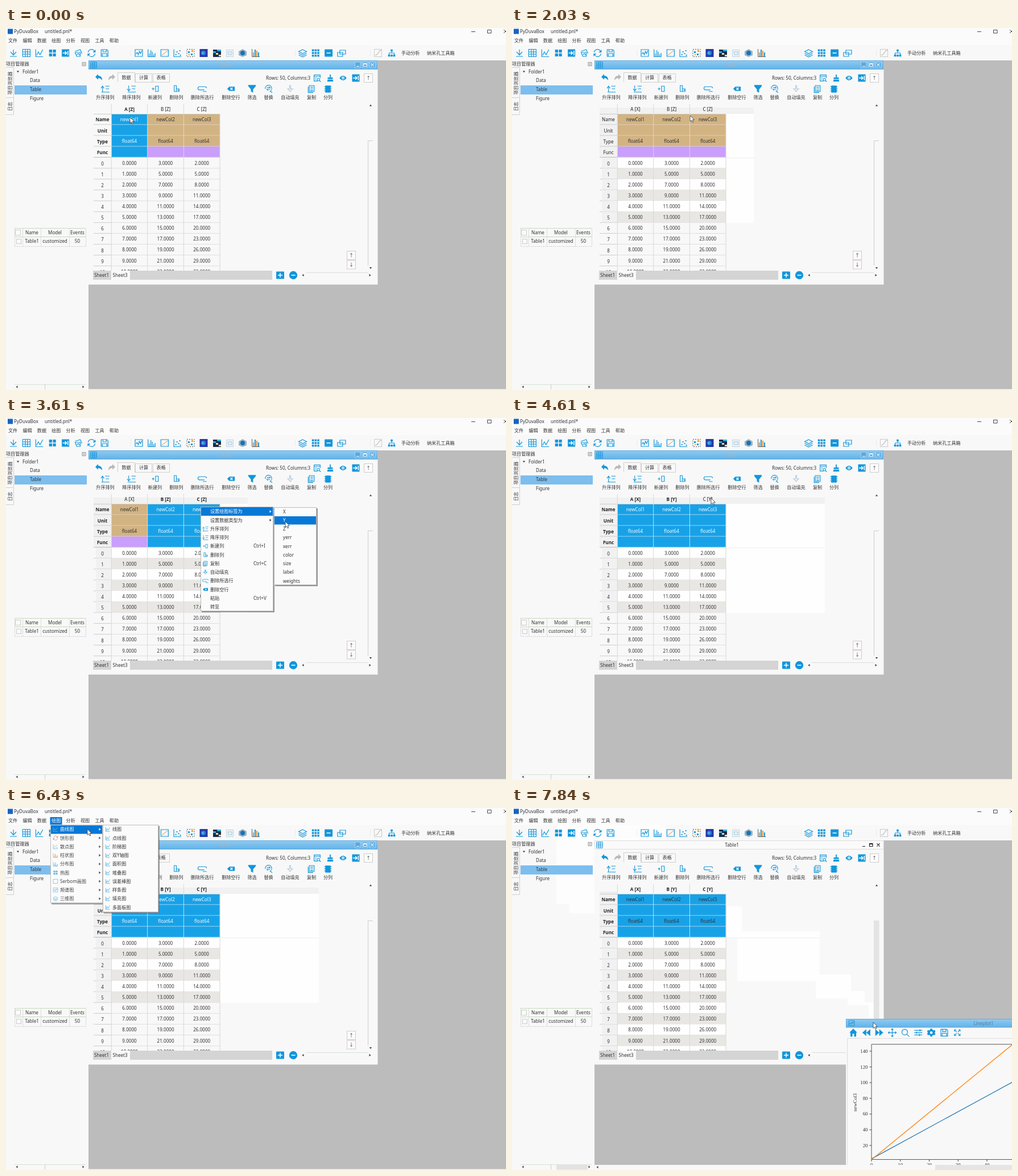
Write an HTML page that moves like this. It is 879 px wide and 637 px high and loops after 8 s.

```html
<!DOCTYPE html>
<html lang="zh-CN">
<head>
<meta charset="utf-8">
<title>Table to line plot</title>
<style>
html,body{margin:0;width:100%;height:100%;overflow:hidden;background:#f8f8f8}
svg{display:block;width:100%;height:100%}
text{font:8.1px 'Noto Sans','Noto Sans CJK SC','Noto Sans CJK',sans-serif;white-space:pre}
.serif text{font:8.8px 'Liberation Serif',serif}
</style>
</head>
<body>
<svg viewBox="0 0 879 637">
<defs>
<linearGradient id="bar" x2="0" y2="1"><stop stop-color="#8fcaf2"/><stop offset="1" stop-color="#62b2e8"/></linearGradient>
<clipPath id="cells"><path d="M146 130H653V427H146Z"/></clipPath>
<clipPath id="plot"><path d="M587 371H879V628H587Z"/></clipPath>
</defs>
<path d="M0 0H879V30H0Z" fill="#fbfbfb"/>
<path id="trace" d="M78 30H270V57H145V185H101V169H78Z" fill="#fdfdfd"/>
<g id="base"></g><g id="live"></g>
</svg>
<script>
const BLUE = '#1296db', SEL = '#17a2e8', HOT = '#0878d7', BG = '#f8f8f8', TAN = '#d2b382', GREY = '#d4d4d4';
const LOOP = 8000, ROW = 19.1, HEAD = 151.3, BODY = HEAD + 4 * ROW;

const text = (x, y, s, o = {}) => `<text x="${x}" y="${y + 2.9}" fill="${o.fill || '#333'}"` +
  `${o.mid ? ' text-anchor="middle"' : ''}${o.end ? ' text-anchor="end"' : ''}` +
  `${o.bold ? ' style="font-weight:700"' : ''}${o.turn ? ` transform="rotate(-90 ${x} ${y})"` : ''}>${s}</text>`;
const mid = (x, y, s, fill, bold) => text(x, y, s, {mid: 1, fill, bold});
const rect = (x, y, w, h, fill, more = '') => `<rect x="${x}" y="${y}" width="${w}" height="${h}" fill="${fill}" ${more}/>`;
const line = (d, stroke, w = 1, more = '') => `<path d="${d}" fill="none" stroke="${stroke}" stroke-width="${w}" ${more}/>`;
const shape = (d, fill) => `<path d="${d}" fill="${fill}" fill-rule="evenodd"/>`;
const frame = (x, y, w, h, fill, stroke) => rect(x + .5, y + .5, w - 1, h - 1, fill, `stroke="${stroke}"`);
const tri = (x, y, turn, fill = '#444') => `<path d="M-1.5-2.2L1.5 0-1.5 2.2Z" fill="${fill}" transform="translate(${x} ${y}) rotate(${turn})"/>`;

// f: filled, s: stroked, w: stroked in white on top
const icons = {
  down: {s: 'M0-6V3M-5-2L0 3.5 5-2M-6 6H6'},
  grid: {s: 'M-6.5-6.5H6.5V6.5H-6.5ZM-6.5-2H6.5M-6.5 2H6.5M-2-6.5V6.5M2-6.5V6.5'},
  chart: {s: 'M-6.5-6.5V6.5H6.5M-5 4L-2-2 1 3 6-6'},
  quad: {f: 'M-6-6h5.3v5.3h-5.3zM.7-6H6v5.3H.7zM-6 .7h5.3V6h-5.3zM.7 .7H6V6H.7z'},
  go: {f: 'M-6.5-6.5H6.5V6.5H-6.5Z', w: 'M-5 0H2M-1-3L2 0-1 3M4.3-4V4'},
  stack: {s: 'M-6-3L3-6 6 1M-6-1H3V6H-3ZM-3 3L0 1 2 4'},
  turn: {s: 'M-6-1A6 6 0 0 1 5-3.5M6 1A6 6 0 0 1-5 3.5', f: 'M7-6V-1H2ZM-7 6V1H-2Z'},
  save: {s: 'M-6-6H4L6-4V6H-6ZM-3-6V-2H3V-6M-4 6V1H4V6'},
  wave: {s: 'M-6.5-6H6.5V6H-6.5ZM-5 2L-3-1-1 3 1-3 3 1 5-4'},
  bars: {s: 'M-6.5-6.5V6.5H6.5M-4 6V1M-1.5 6V-5M1 6V-2M3.5 6V2M6 6V0'},
  slope: {s: 'M-6.5-6H6.5V6H-6.5Z'},
  dots: {s: 'M-6.5-6.5V6.5H6.5', f: 'M-4 2h2v2h-2zM-2-3h2v2h-2zM1 0h2v2H1zM3-5h2v2H3zM4 3h2v2H4z'},
  layers: {s: 'M0-6L7-2.5 0 1-7-2.5ZM-7 .5L0 4 7 .5M-7 3.5L0 7 7 3.5'},
  nine: {f: [-6.5, -1.8, 2.9].flatMap(x => [-6.5, -1.8, 2.9].map(y => `M${x} ${y}h3.6v3.6h-3.6z`)).join('')},
  less: {f: 'M-6-6.5H6Q7-6.5 7-5.5V5.5Q7 6.5 6 6.5H-6Q-7 6.5-7 5.5V-5.5Q-7-6.5-6-6.5Z', w: 'M-3.5 0H3.5'},
  more: {f: 'M-6-6.5H6Q7-6.5 7-5.5V5.5Q7 6.5 6 6.5H-6Q-7 6.5-7 5.5V-5.5Q-7-6.5-6-6.5Z', w: 'M-4 0H4M0-4V4'},
  wins: {s: 'M-3-5H7V2H-3ZM-7-1H2V6H-7Z'},
  tree: {s: 'M0-4V0M-5 4V0H5V4', f: 'M-2-7H2V-3H-2ZM-7 3h4v4h-4zM-2 3H2V7H-2ZM3 3H7V7H3Z'},
  undo: {f: 'M-6-1L-1-6V-3Q6-3 6 5Q3 1-1 1V4Z'},
  redo: {f: 'M6-1L1-6V-3Q-6-3-6 5Q-3 1 1 1V4Z'},
  asc: {s: 'M-5-4V6M-8-1L-5-5-2-1M0-5H8M1 0H7M-7 6H8'},
  desc: {s: 'M-5-6V4M-8 0L-5 4-2 0M0-5H8M1 0H7M-7 6H8'},
  addCol: {s: 'M1-5H6V5H1ZM-6 0H-1M-3.5-2.5V2.5'},
  delCol: {s: 'M-4-6H0V5H-4ZM0 0H5V5H0M2 2.5H6'},
  delSel: {s: 'M4 2H-5Q-8 2-8-1T-5-4H5Q8-4 8-1M1 5H8'},
  delRow: {f: 'M-7 0L-3-4H7V4H-3Z', w: 'M-1-2L3 2M3-2L-1 2'},
  filter: {f: 'M-7-7H7V-5L2 1V7L-2 5V1L-7-5Z'},
  swap: {s: 'M-6 0A6 6 0 1 1 3 4.5L7 7M-3-2H3L1-4M3 1H-3L-1 3'},
  fill: {s: 'M-1-6V0H-4L0 5 4 0H1V-6ZM-6 0H-4M4 0H6'},
  copy: {s: 'M-4-6H5V5H-4ZM-2-3H3M-2 0H3M-2 3H3M-6-4V7H3'},
  split: {f: 'M-5-6H5V7H-5Z', s: 'M-7-4H7M-7 0H7M-7 4H7'},
  find: {s: 'M1 6H-6V-6H6V0M-6-3H6M-4 0H-1M-4 3H-2M0 3A2.5 2.5 0 1 0 5 3 2.5 2.5 0 1 0 0 3M4.5 5L7 7.5'},
  broom: {f: 'M-1-7H1V-1H5V2H-5V-1H-1ZM-5 3H5L6 7H-6Z'},
  eye: {f: 'M-7 0Q0-9 7 0Q0 9-7 0Z', w: 'M-2 0A2 2 0 1 0 2 0 2 2 0 1 0-2 0'},
  home: {f: 'M0-7L7 0H5V7H1.5V2H-1.5V7H-5V0H-7Z'},
  back: {f: 'M0-6V6L-7 0ZM7-6V6L0 0Z'},
  next: {f: 'M0-6V6L7 0ZM-7-6V6L0 0Z'},
  pan: {s: 'M0-7V7M-7 0H7M-2-5L0-7 2-5M-2 5L0 7 2 5M-5-2L-7 0-5 2M5-2L7 0 5 2'},
  zoom: {s: 'M-6-1A5 5 0 1 0 4-1 5 5 0 1 0-6-1M2.5 2.5L7 7'},
  tune: {s: 'M-7-4H7M-7 0H7M-7 4H7M3-6V-2M-3-2V2M2 2V6'},
  gear: {f: 'M-1.5-7H1.5L2-5 4-4 6-4.5 7.3-2 6 0 7.3 2 6 4.5 4 4 2 5 1.5 7H-1.5L-2 5-4 4-6 4.5-7.3 2-6 0-7.3-2-6-4.5-4-4-2-5ZM-2.4 0A2.4 2.4 0 1 0 2.4 0 2.4 2.4 0 1 0-2.4 0Z'},
  full: {s: 'M-5-2V-5H-2M2-5H5V-2M5 2V5H2M-2 5H-5V2M-4-4L-1-1M4-4L1-1M4 4L1 1M-4 4L-1 1'}
};
const icon = (name, x, y, k = 1, c = BLUE, w = 1.2) => {
  const {f, s, w: hole} = icons[name];
  return `<g transform="translate(${x} ${y}) scale(${k})">${f ? shape(f, c) : ''}${s ? line(s, c, w) : ''}${hole ? line(hole, '#fff', 1.5) : ''}</g>`;
};
const iconRow = (names, x, y, gap) => names.split(' ').map((n, i) => icon(n, x + gap * i, y)).join('');

const tools = [['asc', 174.5, '升序排列'], ['desc', 220.5, '降序排列'], ['addCol', 262, '新建列'], ['delCol', 299.5, '删除列'],
  ['delSel', 345, '删除所选行'], ['delRow', 395.5, '删除空行'], ['filter', 432.5, '筛选'], ['swap', 461.5, '替换'],
  ['fill', 499.5, '自动填充'], ['copy', 537, '复制'], ['split', 566, '分列']];

function chrome() {
  let s = rect(3, 1.5, 9, 9, '#1764c0') + text(14, 6, 'PyDuvaBox') + text(68, 6, 'untitled.pnl*');
  s += line('M818 6.5H825M846.5 3.5H853V9H846.5ZM875 3L881 9M881 3L875 9', '#333', .9);
  '文件 编辑 数据 绘图 分析 视图 工具 帮助'.split(' ').forEach((m, i) => s += text(4 + 25.4 * i, 22, m));
  s += iconRow('down grid chart quad go stack turn save', 13, 44, 22.9);
  s += iconRow('wave bars slope dots', 233.5, 44, 22.7) + line('M274 48L284 40', '#e88a3c');
  s += line('M219.5 38V50M508.5 38V50M640.5 38V50', '#ddd', 1, 'stroke-dasharray="1 1"');
  s += line('M318 37.5H331V50.5H318Z', '#555', 1, 'stroke-dasharray="2 2"') +
    shape('M320 41h3v3h-3zM325 45h3v3h-3z', BLUE) + shape('M326 39h3v3h-3zM321 46h2v2h-2z', '#e8a33c');
  s += rect(340.5, 37, 14, 14, '#2638a8') + '<circle cx="347" cy="44" r="4" fill="#2f80d8"/><circle cx="346" cy="44" r="1.8" fill="#48c8d8"/>';
  s += rect(364, 38, 14, 13, '#1a2c4c') + shape('M364 41h5v3h-5zM371 38h7v3h-7z', '#39a8dc') + shape('M369 44h4v3h-4zM374 47h4v3h-4z', '#e8dc90');
  s += frame(387, 38, 13, 13, '#edf3f7', '#c4d4de') + line('M390 42H397V47H391Z', '#9cc4dc');
  s += shape('M409 41L416 37 423 41V48L416 51 409 48Z', '#9db3c2') + '<circle cx="416" cy="44" r="4" fill="#1673b8"/>';
  s += line('M432.5 37V50.5H446', '#666') + shape('M434 43h2v7h-2zM440 40h2v10h-2z', '#e89030') + shape('M437 38h2v12h-2zM443 43h2v7h-2z', BLUE);
  s += iconRow('layers nine less wins', 521.5, 44, 22.8);
  s += frame(647, 37, 14, 14, BG, '#ccc') + line('M649 48Q654 47 655 43T660 39', '#aaa') + icon('tree', 678, 44, .9);
  s += text(695, 44.5, '手动分析') + text(740, 44.5, '纳米孔工具箱');

  // project dock
  s += text(0, 63.5, '项目管理器') + line('M134 60.5H140V66.5H134ZM135.5 62L138.5 65M138.5 62L135.5 65', '#777', .8);
  s += line('M0 69.5H13.5V122.5H0M13.5 123V152.5H0', '#d0d0d0');
  s += text(7, 97, '项目浏览器', {mid: 1, turn: 1}) + text(7, 138, '日志', {mid: 1, turn: 1});
  s += rect(15, 101, 127, 16, '#7dbeee') + tri(21, 77, 90) + text(29, 77, 'Folder1') +
    text(42, 92.5, 'Data') + text(42, 108.5, 'Table') + text(42, 124.5, 'Figure');
  s += line('M15 352.5H140.5M15 367.5H140.5', '#c4dcbc') + line('M29.5 353V384M61.5 353V384M111.5 353V384M140.5 353V384', '#ddd') +
    line('M15.5 353V384.5H140', '#ccc', 1, 'stroke-dasharray="2 1.5"');
  s += frame(16, 355, 10, 10, '#fafafa', '#ccc') + frame(18, 371, 9, 9, '#fafafa', '#ccc');
  ['Name', 'Model', 'Events'].forEach((h, i) => s += mid([45.5, 86, 125.5][i], 360.5, h));
  ['Table1', 'customized', '50'].forEach((h, i) => s += mid([45.5, 86, 125.5][i], 375.5, h));
  s += line('M15 627.5H140', '#d6e2d2') + tri(19, 631.5, 180) + tri(136, 631.5, 0) + line('M68.5 627V636', '#ccc');

  // table window
  s += rect(145, 57, 734, 578.5, '#bcbcbc') + rect(145, 57, 508.5, 394.5, BG);
  s += icon('undo', 163, 87) + icon('redo', 186, 87, 1, '#b8b8b8');
  s += line('M196.5 95V78.5H226.5V95M227.5 95V80.5H256.5V95M258.5 95V80.5H287.5V95M226 95.5H288', '#d0d0d0');
  ['数据', '计算', '表格'].forEach((n, i) => s += mid(211.5 + 30.5 * i, 87, n));
  s += text(457, 88.5, 'Rows: 50, Columns:3') + icon('find', 547, 88, .9) + icon('broom', 570, 88, .9) + icon('eye', 592.5, 88, .9) + icon('go', 615, 88);
  s += frame(629, 80, 16, 16, '#fdfdfd', '#ccc') + mid(637, 88, '↑');
  tools.forEach(([n, x, label]) => s += icon(n, x, 107, .95, n == 'fill' ? '#a9c8dc' : BLUE) + mid(x, 122.5, label));
  s += tri(641, 136, -90) + tri(641, 422.5, 90) + line('M645 198.5H636.5V418', '#c9cfcb');
  [400, 416.5].forEach((y, i) => s += frame(599, y - 8, 16, 16, '#fafafa', '#d5c8d2') + mid(607, y, '↑↓'[i]));
  s += rect(153, 427, 32, 16, GREY) + rect(218, 427, 250, 16, GREY) + text(155, 435, 'Sheet1') + text(187.5, 435, 'Sheet3');
  s += icon('more', 482, 435) + '<circle cx="505" cy="435" r="7.2" fill="#1296db"/>' + line('M501.5 435H508.5', '#fff', 1.5);
  return s + tri(522, 435, 180) + tri(640, 435, 0) + line('M527 430.5H637', '#d9ded8');
}

// start, end, steps, from, to, ease out
const moves = [
  [0, 0, 1, 218, 157], [860, 1180, 4, 232, 160, 314, 161], [1420, 1660, 3, 335, 161, 363, 160], [2030, 2030, 1, 313, 154],
  [2140, 2380, 3, 281, 143, 336, 143], [2580, 2700, 2, 360, 148, 342, 157], [3120, 3490, 4, 375, 162, 486, 168],
  [3610, 3610, 1, 491, 182], [3980, 4320, 4, 440, 165, 216, 143], [4500, 4720, 3, 344, 141, 356, 141],
  [4930, 5530, 6, 330, 130, 86, 23], [5950, 6430, 5, 88, 28, 143, 37], [6540, 6660, 2, 185, 37, 256, 38],
  [6970, 7090, 2, 262, 75, 268, 119], [7210, 7210, 1, 397, 217], [7360, 7840, 5, 530, 290, 635, 377, 1]
];
function pointer(t) {
  const [a, b, n, x0, y0, x1 = x0, y1 = y0, ease] = moves.filter(m => m[0] <= t).pop();
  const i = b > a ? Math.min(n - 1, Math.floor((t - a) / (b - a) * (n - 1) + .02)) : 0;
  let u = n > 1 ? i / (n - 1) : 0;
  if (ease) u = 1 - (1 - u) ** 2;
  return [x0 + (x1 - x0) * u, y0 + (y1 - y0) * u];
}
// latest value whose time has come
const at = (t, list) => list.filter(e => e[0] <= t).pop()[1];
const NONE = [9, 9];
const selection = t => at(t, [[0, [0, 0]], [2030, NONE], [2140, [1, 1]], [2260, [1, 2]], [3980, NONE], [4320, [0, 0]], [4500, [0, 1]], [4610, [0, 2]]]);

function table(t) {
  const [first, last] = selection(t), any = first < 9, idle = t >= 7210;
  const yz = t >= 3980 ? 'Y' : 'Z', roles = [t >= 2030 ? 'X' : 'Z', yz, yz];
  const right = at(t, [[0, 0], [510, 350], [2030, 425], [3980, 550], [7210, 376]]);
  const bottom = idle ? 428 : 342.5;
  let s = '';
  if (right > 376) s += rect(376, 151, right - 376, 192, '#fefefe') + rect(154, 140, right - 154, 11, '#f1f1f1') + line(`M376 228.5H${right}`, '#eee');
  if (idle) s += shape('M378 173H404V217H541V293H596V322H620V342H635V370H627V347H590V335H534V305H396V228H378Z', '#fefefe') +
    line('M378 228.5H541', '#eee') + rect(154, 147, 31, 4, '#eee');
  for (let i = 0; i < 11; i++) {
    const y = BODY + ROW * i, h = Math.min(ROW, bottom - y);
    if (right && h > 0) {
      const x = t < 2030 ? 185 : 158;
      if (x < 185) s += rect(x, y, 27, h, '#f1f1f1');
      s += rect(185, y, Math.min(right, 376) - 185, h, i % 2 ? '#e8e7e3' : '#fefefe');
    }
    s += line(`M154 ${y + ROW}H185`, '#ccc') + line(`M185 ${y + ROW}H376`, '#e2dde0') + mid(169.5, y + 11.1, i);
    [i, 3 + 2 * i, 2 + 3 * i].forEach((v, c) => s += mid(217 + 63.6 * c, y + 10, v.toFixed(4)));
  }
  ['Name', 'Unit', 'Type', 'Func'].forEach((h, r) => {
    const y = HEAD + ROW * r;
    s += rect(154, y, 31, ROW, t >= 2030 ? '#f1f1f1' : BG) + line(`M154 ${y + ROW - .3}H185`, '#bbb') + mid(169.5, y + 10.2, h, '#222', any);
    for (let c = 0; c < 3; c++) {
      const on = c >= first && c <= last, x = 185.3 + 63.6 * c;
      s += rect(x, y, 63.6, ROW, on ? SEL : r < 3 ? TAN : '#c99efc') + line(`M${x} ${y + ROW - .4}H${x + 63.6}`, on ? '#b8dcf2' : '#ddd0c4');
      if (r % 2 == 0) s += mid(x + 31.7, y + 9.3, r ? 'float64' : `newCol${c + 1}`, on && !idle ? '#f4fbff' : '#333');
    }
  });
  roles.forEach((role, c) => s += mid(217 + 63.6 * c, 142.8, `${'ABC'[c]} [${role}]`, '#222', c >= first && c <= last && !(c == 2 && t >= 4610 && t < 4720)));
  s += line('M154 151.5H376', '#ccc') + line('M185.3 134V427M248.7 134V427M312.4 134V427M376 152V427', '#d6dad2');
  return `<g clip-path="url(#cells)">${s}</g>`;
}

function titleBar(idle) {
  const ink = idle ? '#222' : '#fff';
  return rect(145.5, 57.5, 507.5, 15, idle ? '#fafafa' : 'url(#bar)', `stroke="${idle ? '#ddd' : '#62acdf'}"`) + icon('grid', 154, 65, .8) +
    mid(386.5, 65.5, 'Table1', idle ? '#333' : '#a3b6c4') +
    (idle ? '' : [613, 626, 639].map(x => frame(x, 59.5, 10.5, 11, '#5aa9e0', '#a5d4f3')).join('')) +
    line('M616 67.5H621M628.5 62.5H634V67.5H628.5ZM628 63.5H634M641.5 62.5L646.5 67.5M646.5 62.5L641.5 67.5', ink, 1.2);
}

function box(x, y, w, h) {
  return rect(x + 2, y + 2, w, h, '#777', 'opacity=".75"') + frame(x, y, w, h, '#fbfbfb', '#bbb');
}
const STEP = 15.25;
const entries = [['', '设置绘图标签为'], ['', '设置数据类型为'], ['asc', '升序排列'], ['desc', '降序排列'], ['addCol', '新建列', 'Ctrl+I'], ['delCol', '删除列'],
  ['copy', '复制', 'Ctrl+C'], ['fill', '自动填充'], ['delSel', '删除所选行'], ['delRow', '删除空行'], ['', '粘贴', 'Ctrl+V'], ['', '转至']];
function contextMenu(x, hot, sub) {
  let s = box(x, 156, 128, 184);
  entries.forEach(([n, label, key], i) => {
    const y = 164.5 + STEP * i, on = hot && !i;
    if (on) s += rect(x + 1, 157, 126, 15, HOT);
    if (n) s += icon(n, x + 8.5, y, .65);
    s += text(x + 17, y, label, {fill: on ? '#fff' : '#333'});
    if (i < 2) s += tri(x + 123, y, 0, on ? '#fff' : '#333');
    if (key) s += text(x + 93, y, key);
  });
  if (sub === undefined) return s;
  s += box(x + 129, 157, 75, 137);
  ['X', 'Y', 'Z', 'yerr', 'xerr', 'color', 'size', 'label', 'weights'].forEach((n, i) => {
    const y = 164.7 + STEP * i;
    if (i == sub) s += rect(x + 130, y - 7, 73, 14.5, HOT);
    s += text(x + 145, y, n, {fill: i == sub ? '#fff' : '#333'});
  });
  return s;
}

const kinds = [['chart', '曲线图'], ['turn', '饼形图'], ['dots', '散点图'], ['bars', '柱状图'], ['bars', '分布图'], ['quad', '热图'], ['slope', 'Serbom画图'], ['wave', '频谱图'], ['layers', '三维图']];
const curves = ['线图', '点线图', '阶梯图', '双Y轴图', '面积图', '堆叠图', '误差棒图', '样条图', '填充图', '多面板图'];
function plotMenu(t) {
  let s = box(78, 29.5, 92, 138);
  kinds.forEach(([n, label], i) => {
    const y = 37.5 + STEP * i, on = !i && t >= 6070;
    if (on) s += rect(79, y - 7, 90, 15, HOT);
    s += icon(n, 87, y, .6, ['#6fb4dc', '#c98b6a', '#6fb4dc', '#d9a066'][i] || '#6fb4dc') + text(95, y, label, {fill: on ? '#fff' : '#444'}) + tri(165, y, 0, on ? '#fff' : '#444');
  });
  s = `<g opacity="${at(t, [[0, .25], [5830, .58], [5950, 1]])}">${s}</g>`;
  if (t < 6190) return s;
  let sub = box(170, 29.5, 98, 154);
  curves.forEach((label, i) => {
    const y = 37.5 + STEP * i, on = !i && t >= 6540;
    if (on) sub += rect(171, y - 7, 96, 15, HOT);
    sub += icon('chart', 179, y, .55) + text(187, y, label, {fill: on ? '#fff' : '#333'});
  });
  return s + `<g opacity="${t < 6310 ? .5 : 1}">${sub}</g>`;
}

function plotWindow() {
  const px = v => 632 + v * 5.075, py = v => 621.5 - v * 1.3825;
  const s = rect(145, 628, 734, 9, BG) + rect(744, 628, 135, 9, '#e5e5e5') + tri(150, 632, 180) + rect(78, 627.5, 55, 9, '#e3e3e3') +
    rect(636, 198, 9.5, 220, '#e3e4e3');
  let w = rect(587, 371, 292, 257, BG) + rect(587.5, 371.5, 300, 14.5, 'url(#bar)', 'stroke="#62acdf"') + icon('wave', 597, 378.5, .75) + mid(829, 379, 'Lineplot1', '#557f9c');
  w += iconRow('home back next pan zoom tune gear save full', 600, 395.3, 22.85) + line('M879 405.5H589.5V628', '#ddd');
  w += line('M879 415.8H632V618.5H879', '#444', .9);
  w += line(`M${px(0)} ${py(3)}L${px(49)} ${py(101)}`, '#1f77b4', 1.2) + line(`M${px(0)} ${py(2)}L${px(49)} ${py(149)}`, '#ff7f0e', 1.2);
  let ticks = '';
  for (let v = 20; v <= 140; v += 20) ticks += line(`M628.5 ${py(v)}H632`, '#444') + text(625.5, py(v), v, {end: 1});
  for (let v = 0; v <= 40; v += 10) ticks += line(`M${px(v)} 618.5V622`, '#444') + mid(px(v), 628.5, v);
  ticks += text(603, 518, 'newCol3', {mid: 1, turn: 1});
  return s + `<g clip-path="url(#plot)">${w}<g class="serif">${ticks}</g></g>`;
}

function scene(t) {
  const idle = t >= 7210, [x, y] = pointer(t);
  let s = titleBar(idle) + table(t);
  if (t >= 6970 && !idle) s += rect(145, 90, 153, 41, 'rgba(0,0,0,.02)');
  if (t >= 5710 && !idle) s += rect(77.5, 16, 21, 13.5, HOT) + text(80.2, 22, '绘图', {fill: '#fff'});
  if (t >= 510 && t < 2030) s += contextMenu(220, t >= 860, t >= 1660 ? 0 : t >= 1420 ? -1 : undefined);
  if (t >= 3000 && t < 3980) s += contextMenu(342, t >= 3120, at(t, [[0, undefined], [3240, -1], [3367, 0], [3610, 1]]));
  if (t >= 5710 && t < 6970) s += plotMenu(t);
  if (idle) s += plotWindow();
  return s + `<path transform="translate(${x} ${y})" d="M0 0V10.5L2.4 8.3 4.1 12 5.9 11.2 4.2 7.6H7.4Z" fill="#fff" stroke="#333" stroke-width=".8"/>`;
}

const live = document.getElementById('live'), trace = document.getElementById('trace');
document.getElementById('base').innerHTML = chrome();
let shown = '';
function tick(now) {
  const t = now % LOOP, next = scene(t);
  trace.setAttribute('opacity', t >= 6970 ? 1 : 0);
  if (next !== shown) live.innerHTML = shown = next;
  requestAnimationFrame(tick);
}
tick(performance.now());
</script>
</body>
</html>
```
